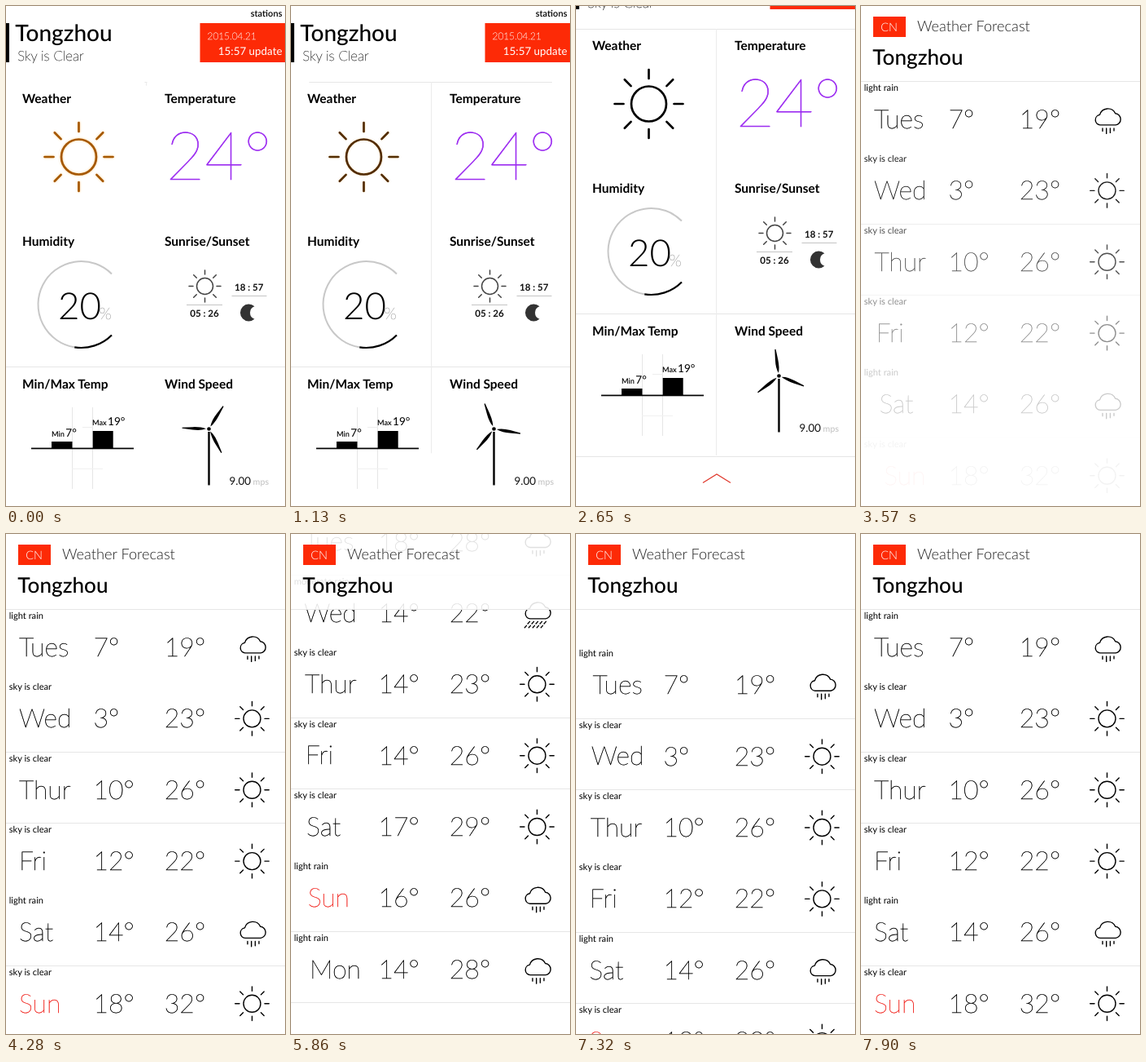
These frames come from a looping animation (343 by 613 pixels, 8000 ms). An HTML page:

```html
<!DOCTYPE html>
<html lang="en">
<head>
<meta charset="utf-8">
<title>Weather</title>
<style>
  html, body { margin: 0; width: 100%; height: 100%; overflow: hidden; background: #fff; }
  svg { display: block; width: 343px; height: 613px; }
  text { font-family: Lato, sans-serif; text-rendering: geometricPrecision; white-space: pre; }
</style>
</head>
<body>
<svg id="stage" viewBox="0 0 343 613"></svg>
<script>
const LOOP = 8000, W = 343, H = 613;
const RED = '#fd2a06', RULE = '#e6e6e6';
const ROW = 87.36, TOP = 92.4, LIST_IN = 3050, LIST_END = 694.6;

const clamp = v => Math.max(0, Math.min(1, v));
const smooth = v => { v = clamp(v); return v * v * (3 - 2 * v); };

// ---- drawing helpers ----
const text = (x, y, size, weight, str, fill = '#000', anchor = 'start', extra = '') =>
  `<text x="${x}" y="${y}" font-size="${size}" font-weight="${weight}" fill="${fill}" text-anchor="${anchor}" ${extra}>${str}</text>`;
// Hairline type, with a slight outline to keep it legible.
const thin = (x, y, size, str, fill = '#000') =>
  text(x, y, size, 100, str, fill, 'start', `stroke="${fill}" stroke-width="${0.25 + size * 0.005}"`);
const rect = (x, y, w, h, fill, extra = '') =>
  `<rect x="${x}" y="${y}" width="${w}" height="${h}" fill="${fill}" ${extra}/>`;
const path = (d, stroke, width, extra = '') =>
  `<path d="${d}" fill="none" stroke="${stroke}" stroke-width="${width}" ${extra}/>`;

function sun(cx, cy, r, from, to, width, color) {
  let d = '';
  for (let i = 0; i < 8; i++) {
    const c = Math.cos(i * Math.PI / 4), s = Math.sin(i * Math.PI / 4);
    d += `M${cx + c * from} ${cy + s * from}L${cx + c * to} ${cy + s * to}`;
  }
  return `<circle cx="${cx}" cy="${cy}" r="${r}" fill="none" stroke="${color}" stroke-width="${width}"/>` +
    path(d, color, width, 'stroke-linecap="round"');
}

function arc(cx, cy, r, a, b) {
  const at = deg => {
    const q = deg * Math.PI / 180;
    return `${cx + r * Math.cos(q)} ${cy + r * Math.sin(q)}`;
  };
  return `M${at(a)}A${r} ${r} 0 ${b - a > 180 ? 1 : 0} 1 ${at(b)}`;
}

function rain(moderate) {
  let d = 'M294 53.5a6.3 6.3 0 0 1-.5-12.5a10.3 10.3 0 0 1 19.2-1.6a7.1 7.1 0 0 1 .4 14.1z';
  if (moderate) {
    for (let i = 0; i < 5; i++) d += `M${293.5 + i * 5} 57l-2.4 2.6M${289.5 + i * 5} 62l-2.2 2.4`;
  } else {
    d += 'M297 57.5v3.5M301.7 57.5v6.5M306.4 57.5v5.5M311 57.5v3';
  }
  return path(d, '#000', 1.4, 'stroke-linecap="round" stroke-linejoin="round"');
}

// ---- dashboard ----
const label = (x, y, str) => text(x, y, 15.5, 700, str);
const blade = 'M3.5 0Q10-2.8 20-1.8L33-.6V.6L20 1.6Q10 2.3 3.5 0z';

const dashboard =
  text(339.5, 13, 11.1, 600, 'stations', '#000', 'end') +
  rect(0, 21, 4, 48, '#000') +
  text(11.3, 42.5, 28, 500, 'Tongzhou') +
  thin(14.3, 67, 16.8, 'Sky is Clear', '#222') +
  rect(238.5, 21, 105, 48, RED) +
  thin(247.6, 41, 11.8, '2015.04.21', '#fff') +
  text(339.5, 59.5, 13.4, 400, '15:57 update', '#fff', 'end') +

  label(20, 119, 'Weather') + label(195, 119, 'Temperature') +
  label(20, 294, 'Humidity') + label(195, 294, 'Sunrise/Sunset') +
  label(20, 468.7, 'Min/Max Temp') + label(195, 468.7, 'Wind Speed') +

  `<g id="sun">${sun(89.5, 185, 21.5, 31, 42, 2.7, 'currentColor')}</g>` +
  thin(196.5, 212.5, 82.5, '24°', '#9a28f0') +

  path(arc(92.5, 366, 53, 99, 315), '#c8c8c8', 2) +
  path(arc(92.5, 366, 53, 45, 99), '#000', 2.2) +
  text(64, 384, 45.7, 300, '20') + thin(114.5, 383.5, 20, '%', '#aaa') +

  sun(244.5, 343.5, 10, 14.5, 19.5, 1.5, '#444') +
  rect(222, 366, 44, 1, '#c4c4c4') + rect(277.5, 355, 43, 1, '#c4c4c4') +
  text(244, 381, 11.6, 700, '05 : 26', '#111', 'middle') +
  text(298.7, 348.5, 11.6, 700, '18 : 57', '#111', 'middle') +
  '<path d="M305.5 368.2A10.5 10.5 0 1 0 305.5 383.8A8.3 8.3 0 0 1 305.5 368.2z" fill="#333"/>' +

  rect(81, 492, 1, 100, RULE) + rect(106, 492, 1, 100, RULE) +
  rect(94, 516, 13, 1, '#eee') + rect(81, 567, 38, 1, '#f1f1f1') +
  rect(31, 541.6, 126, 1.7, '#000') +
  rect(56, 534, 25.5, 8, '#000') + rect(106.7, 521, 25, 21, '#000') +
  text(56, 527.5, 9.2, 600, 'Min') + text(73.3, 527.5, 13.6, 400, '7°') +
  text(106, 514, 9.2, 600, 'Max') + text(125, 514, 13.6, 400, '19°') +

  rect(248.3, 522, 2.4, 65.5, '#000') +
  '<g id="mill">' + [60, 180, 300].map(a => `<path d="${blade}" transform="rotate(${a})"/>`).join('') + '</g>' +
  '<circle cx="249.5" cy="518.5" r="2.3"/>' +
  text(274.5, 587, 13.4, 400, '9.00', '#111') + text(303.5, 587, 10.7, 600, 'mps', '#c8c8c8') +
  path('M156 649.5L173 639L190 649.5', '#e0382c', 1.3);

// ---- forecast ----
const L = 'light rain', M = 'moderate rain', C = 'sky is clear';
const days = [
  ['Tues', 7, 19, L], ['Wed', 3, 23, C], ['Thur', 10, 26, C], ['Fri', 12, 22, C],
  ['Sat', 14, 26, L], ['Sun', 18, 32, C], ['Mon', 18, 28, L], ['Tues', 18, 28, L],
  ['Wed', 14, 22, M], ['Thur', 14, 23, C], ['Fri', 14, 26, C], ['Sat', 17, 29, C],
  ['Sun', 16, 26, L], ['Mon', 14, 28, L]
];
const rows = days.map(([day, low, high, sky]) =>
  '<g class="row">' + text(3.7, 11.6, 11.1, 400, sky) +
  `<g class="day">${thin(16, 57.4, 32, day, day === 'Sun' ? '#f0201a' : '#000')}</g>` +
  thin(107.4, 57.6, 32, low + '°') + thin(194.8, 57.6, 32, high + '°') +
  (sky === C ? sun(302.5, 46.6, 10.5, 15.5, 20.8, 1.4, '#000') : rain(sky === M)) + '</g>').join('');

const header =
  rect(0, 0, W, 92, '#fff', 'fill-opacity=".88"') + rect(0, 92, W, 1, RULE) +
  rect(15, 13, 40, 25, RED) +
  text(34.6, 31, 14.5, 300, 'CN', '#fff', 'middle') +
  text(69, 31, 18.2, 300, 'Weather Forecast', '#222') +
  text(14.3, 72, 26.1, 500, 'Tongzhou');

const rules = n => rect(0, 0, W, 1, RULE, 'class="rule"').repeat(n);
const stage = document.getElementById('stage');
stage.innerHTML =
  `<g id="dash"><g>${rules(4)}${rect(172, 0, 1, 0, '#ececec', 'id="divider"')}</g><g id="page">${dashboard}</g></g>` +
  `<g id="list">${rules(days.length + 1)}${rows}<g id="header">${header}</g></g>`;

const $ = id => document.getElementById(id);
const [dash, page, list, head, mill, sunIcon, divider] =
  ['dash', 'page', 'list', 'header', 'mill', 'sun', 'divider'].map($);
const dashRules = dash.querySelectorAll('.rule');
const listRules = list.querySelectorAll('.rule');
const rowEls = list.querySelectorAll('.row');
const dayEls = list.querySelectorAll('.day');

// ---- motion ----
// One flick: run past the end, then settle back.
function flick(ms) {
  const over = 0.0673;
  return ms < 470 ? (1 + over) * smooth(ms / 470) : 1 + over * (1 - smooth((ms - 470) / 550));
}
const listScroll = t => LIST_END * (flick(Math.max(0, t - 5360)) - flick(Math.max(0, t - 6820)));
const rowY = (k, t) => TOP + ROW * k - listScroll(t);

// Times at which each row comes into view; its day name then glides in.
const entries = days.map((_, k) => {
  const times = [];
  let was = false;
  for (let t = LIST_IN; t < LOOP; t += 5) {
    const y = rowY(k, t), on = y > -ROW && y < H;
    if (on && !was) times.push(t === LIST_IN ? t + k * 90 : t);
    was = on;
  }
  return times;
});

function dayShift(k, t) {
  const at = entries[k].filter(v => v <= t).pop();
  return at === undefined ? 18 : 18 * (1 - clamp((t - at) / 400)) ** 2;
}

// Rules are thinner than a pixel: they show only where they cover a pixel row's sample.
function placeRule(el, y) {
  const top = Math.floor(y);
  el.setAttribute('y', top);
  el.style.display = y - top < 0.68 ? '' : 'none';
}

function drawDash(t) {
  const scroll = 65 * smooth((t - 1690) / 780);
  const grow = t < 1690 ? 1 - Math.exp(-(t + 4) / 555) : 1;
  dash.style.opacity = 1 - smooth((t - 2720) / 500);
  page.setAttribute('transform', `translate(0 ${-scroll})`);
  dashRules.forEach((el, i) => placeRule(el, 93.04 + 2 * ROW * i - scroll));
  dashRules[0].setAttribute('x', 172 - 172 * grow);
  dashRules[0].setAttribute('width', W * grow);
  divider.setAttribute('y', 93 - scroll);
  divider.setAttribute('height', 523 * grow);
  mill.setAttribute('transform', `translate(249.5 518.5) rotate(${2 + 0.166 * t})`);
  const warm = clamp(1 - t / 2250);
  sunIcon.style.color = `rgb(${165 * warm}, ${88 * warm}, 0)`;
  sunIcon.style.filter = warm ? `drop-shadow(0 0 1.5px rgba(255, 160, 40, ${0.5 * warm}))` : 'none';
}

function drawList(t) {
  head.style.opacity = smooth((t - 2900) / 600);
  listRules.forEach((el, k) => {
    placeRule(el, rowY(k, t));
    el.style.opacity = smooth((t - LIST_IN - k * 90) / 550);
  });
  rowEls.forEach((el, k) => {
    el.setAttribute('transform', `translate(0 ${rowY(k, t)})`);
    el.style.opacity = smooth((t - LIST_IN - k * 90) / 550);
    dayEls[k].setAttribute('transform', `translate(${dayShift(k, t)} 0)`);
  });
}

function draw(t) {
  const onDash = t < 3220, onList = t > 2900;
  dash.style.display = onDash ? '' : 'none';
  list.style.display = onList ? '' : 'none';
  if (onDash) drawDash(t);
  if (onList) drawList(t);
}

const start = performance.now();
function tick() {
  draw((performance.now() - start) % LOOP);
  requestAnimationFrame(tick);
}
tick();
</script>
</body>
</html>
```
